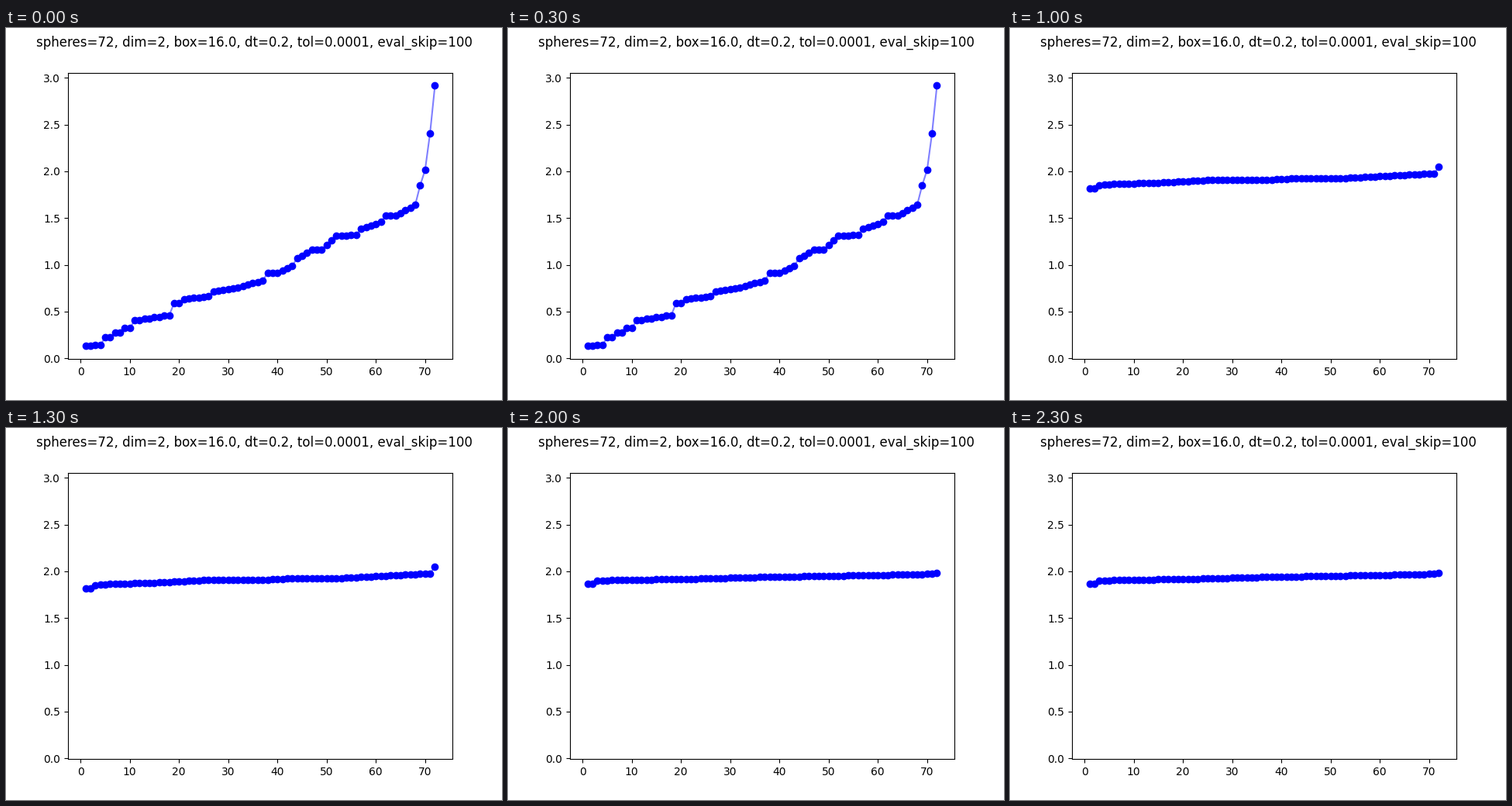
These frames come from a looping animation (640x480 px, 2500 ms). A matplotlib script:

```python
import numpy as np
import matplotlib.pyplot as plt
from matplotlib.animation import FuncAnimation

rank = np.arange(1, 73)


def curve(*points, paired=0):
    """Join (rank, level) points; the lowest ranks may share levels in pairs."""
    x = np.where(rank <= paired, rank - (rank + 1) % 2, rank)
    return np.interp(x, *zip(*points))


# Random start: paired steps, a ragged climb, then a steep tail.
start = curve(
    (1, .131), (3, .14), (5, .223), (9, .323), (11, .405), (17, .457),
    (19, .59), (21, .63), (26, .667), (27, .712), (32, .758), (37, .833),
    (38, .91), (40, .91), (43, .99), (44, 1.07), (47, 1.16), (49, 1.16),
    (52, 1.31), (56, 1.32), (57, 1.385), (61, 1.457), (62, 1.525),
    (64, 1.525), (68, 1.643), (69, 1.85), (70, 2.015), (71, 2.405),
    (72, 2.917), paired=20)

# Each later state is a nearly flat line with a few kinks at its ends.
states = [
    start,
    curve((1, 1.8), (8, 1.811), (28, 1.858), (54, 1.914), (57, 1.932),
          (70, 1.95), (71, 1.966)),
    curve((2, 1.816), (3, 1.85), (6, 1.865), (14, 1.876), (25, 1.906),
          (37, 1.91), (43, 1.924), (53, 1.927), (67, 1.967), (71, 1.975),
          (72, 2.05)),
    curve((1, 1.85), (4, 1.858), (5, 1.883), (25, 1.91), (63, 1.952),
          (67, 1.968), (71, 1.975), (72, 1.99)),
    curve((2, 1.866), (3, 1.902), (10, 1.909), (21, 1.918), (36, 1.939),
          (69, 1.968), (72, 1.983)),
]

fig, ax = plt.subplots(figsize=(6.4, 4.8), dpi=100)
fig.suptitle("spheres=72, dim=2, box=16.0, dt=0.2, tol=0.0001, eval_skip=100")
dots, = ax.plot(rank, start, "bo")
link, = ax.plot(rank, start, "b-", alpha=0.5)


def update(i):
    dots.set_ydata(states[i])
    link.set_ydata(states[i])
    return dots, link


anim = FuncAnimation(fig, update, frames=len(states), interval=500,
                     repeat=True, repeat_delay=0)
plt.show()
```
